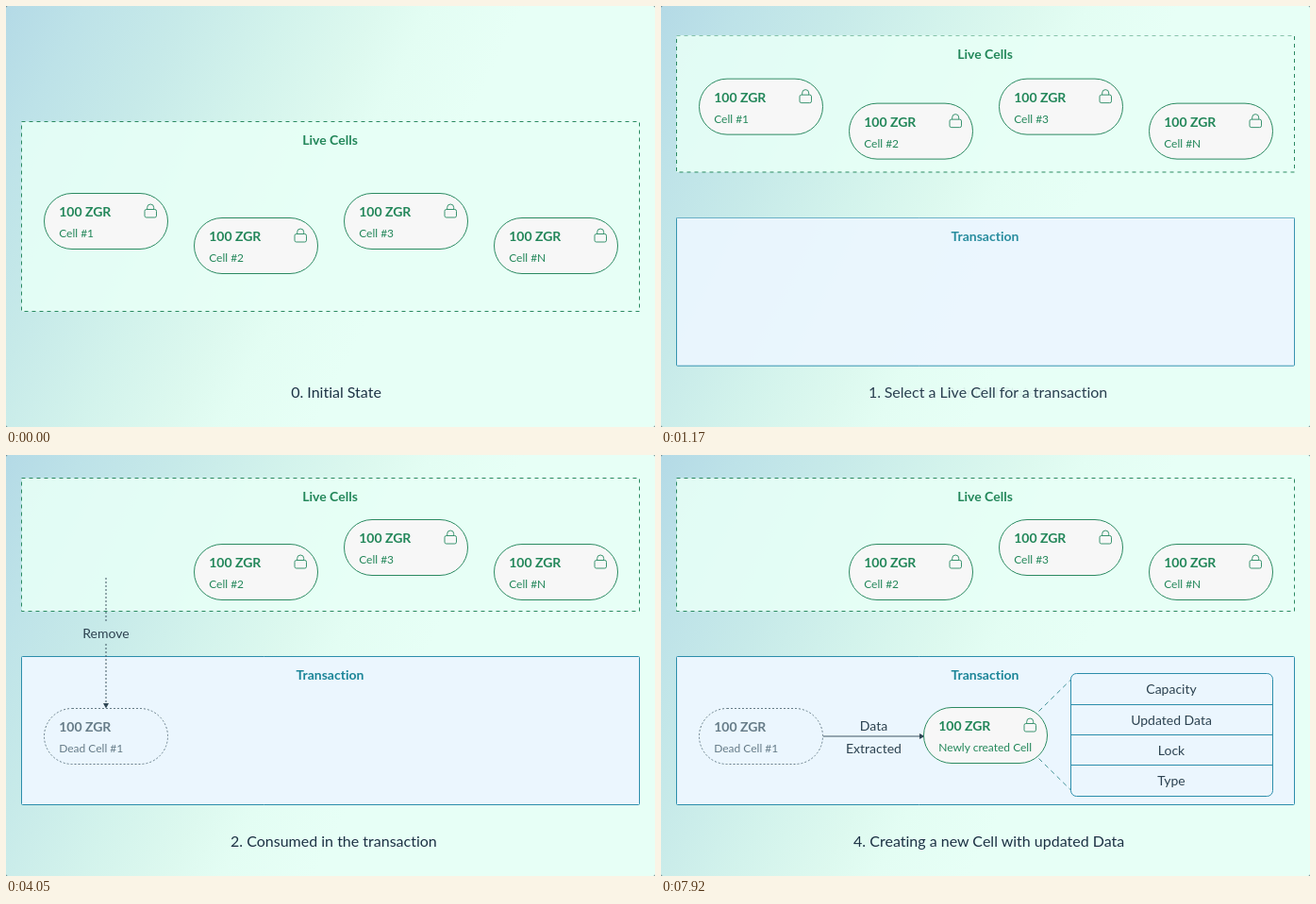
Recreate the animation shown at these times as an HTML page. Size 688 by 446 pixels, loop 8000 ms.

```html
<!DOCTYPE html>
<html lang="en">
<head>
<meta charset="utf-8">
<title>Cell life cycle</title>
<style>
  html, body { margin: 0; width: 100%; height: 100%; overflow: hidden; background: #4d6b72; }
  svg { display: block; width: 688px; height: 446px; font-family: Lato, sans-serif; font-variant-ligatures: none; }

  text { font-size: 14px; fill: #2c4250; }
  .mid { text-anchor: middle; }
  .bold { font-weight: 700; }
  .sub { font-size: 12px; }
  .caption text { font-size: 16px; fill: #1c3144; }
  .title, .live text, .head { fill: #23875a; }
  .dead text { fill: #667c88; }
  .tx { fill: #1b8598; }

  .shell { fill: #f7f7f7; stroke: #2b8a61; }
  .lock { fill: none; stroke: #3a9470; }
  .dead rect { fill: none; stroke: #667c88; stroke-dasharray: 2 2; }
  .teal { fill: #ebf6fe; stroke: #2b8dab; }
  .wire { fill: none; stroke: #3f5663; }
  .tip { fill: #2f4654; }

  /* Each rule below names the step at which a part moves, enters or leaves. */
  .a { animation: 8s ease-in-out infinite both; }
  .box { animation-name: box; }
  .boxmove { animation-name: boxmove; }
  .cells { animation-name: cells; }
  .txmove { animation-name: txmove; }
  .drop { animation-name: drop; }
  .in1 { animation-name: in1; }
  .out1 { animation-name: out1; }
  .in2 { animation-name: in2; }
  .out2 { animation-name: out2; }
  .in3 { animation-name: in3; }
  .out3 { animation-name: out3; }
  .in4 { animation-name: in4; }
  .out4 { animation-name: out4; }
  .in5 { animation-name: in5; }
  .mark { animation-name: mark; }

  @keyframes box {
    0%, 6.7125% { height: 201px; }
    16.3875%, 100% { height: 141px; }
  }
  @keyframes boxmove {
    0%, 6.7125% { transform: translateY(0); }
    16.3875%, 100% { transform: translateY(-98px); }
  }
  @keyframes cells {
    0%, 6.7125% { transform: translateY(0); }
    16.3875%, 100% { transform: translateY(-130px); }
  }
  @keyframes txmove {
    0%, 6.7125% { transform: translateY(161px); opacity: 0; }
    16.3875%, 100% { transform: translateY(0); opacity: 1; }
  }
  @keyframes drop {
    0%, 29.5625% { transform: translateY(0); }
    42.1875%, 100% { transform: translateY(200px); }
  }
  @keyframes mark {
    0%, 22.375% { opacity: 0; }
    25.75%, 29.5625% { opacity: 1; }
    42.1875%, 100% { opacity: 0; }
  }
  @keyframes in1 { 0%, 6.7125% { opacity: 0; } 16.3875%, 100% { opacity: 1; } }
  @keyframes out1 { 0%, 6.7125% { opacity: 1; } 16.3875%, 100% { opacity: 0; } }
  @keyframes in2 { 0%, 29.5625% { opacity: 0; } 42.1875%, 100% { opacity: 1; } }
  @keyframes out2 { 0%, 29.5625% { opacity: 1; } 42.1875%, 100% { opacity: 0; } }
  @keyframes in3 { 0%, 50.375% { opacity: 0; } 57.5%, 100% { opacity: 1; } }
  @keyframes out3 { 0%, 50.375% { opacity: 1; } 57.5%, 100% { opacity: 0; } }
  @keyframes in4 { 0%, 72.9375% { opacity: 0; } 79.3125%, 100% { opacity: 1; } }
  @keyframes out4 { 0%, 72.9375% { opacity: 1; } 79.3125%, 100% { opacity: 0; } }
  @keyframes in5 { 0%, 86.0625% { opacity: 0; } 94.1875%, 100% { opacity: 1; } }
</style>
</head>
<body>
<svg viewBox="0 0 688 446">
  <defs>
    <linearGradient id="sky" gradientUnits="userSpaceOnUse" x1="0" y1="0" x2="440" y2="220">
      <stop offset="0" stop-color="#b4dae6"/>
      <stop offset=".15" stop-color="#bde2e8"/>
      <stop offset=".35" stop-color="#c7eae9"/>
      <stop offset=".55" stop-color="#d3f3ec"/>
      <stop offset=".72" stop-color="#ddf9ef"/>
      <stop offset=".82" stop-color="#e3fdf3"/>
      <stop offset="1" stop-color="#e7fff6"/>
    </linearGradient>
    <g id="cell">
      <rect class="shell" width="131" height="59" rx="29.5"/>
      <g class="lock">
        <rect x="106.5" y="17" width="12.5" height="8.5" rx="1.8"/>
        <path d="M109.2 17v-2a3.5 3.5 0 0 1 7 0V17"/>
      </g>
      <text class="bold title" x="15.7" y="24.5">100 ZGR</text>
    </g>
  </defs>

  <rect width="688" height="446" rx="2" fill="url(#sky)"/>

  <g class="a boxmove">
    <rect class="a box" x="16.5" y="122.5" width="655" height="201" fill="#e7fff6" fill-opacity=".88"
          stroke="#2b8a61" stroke-dasharray="4 4"/>
    <text class="bold head mid" x="343.5" y="147">Live Cells</text>
  </g>

  <g class="a txmove">
    <rect class="teal" x="16.5" y="213.5" width="655" height="157" rx="1"/>
    <text class="bold tx mid" x="343.5" y="238">Transaction</text>
  </g>

  <rect class="a mark" x="33" y="58" width="146.5" height="80" fill="none" stroke="#c6c81c" stroke-width="2"/>

  <g class="a in2"><g class="a out3">
    <path class="wire" d="M106 130V178M106 200V264" stroke-dasharray="2 2"/>
    <path class="tip" d="M103 263h6l-3 5.5z"/>
    <text class="mid" x="106" y="194">Remove</text>
  </g></g>

  <g class="a cells">
    <g transform="translate(40.5 198.5)"><g class="a drop">
      <g class="a live out2">
        <use href="#cell"/>
        <text class="sub" x="15.7" y="46.5">Cell #1</text>
      </g>
      <g class="a dead in2">
        <rect width="131" height="59" rx="29.5"/>
        <text class="bold" x="15.7" y="24.5">100 ZGR</text>
        <text class="sub" x="15.7" y="46.5">Dead Cell #1</text>
      </g>
    </g></g>
    <g class="live" transform="translate(199.5 224.5)">
      <use href="#cell"/>
      <text class="sub" x="15.7" y="46.5">Cell #2</text>
    </g>
    <g class="live" transform="translate(358.5 198.5)">
      <use href="#cell"/>
      <text class="sub" x="15.7" y="46.5">Cell #3</text>
    </g>
    <g class="live" transform="translate(517.5 224.5)">
      <use href="#cell"/>
      <text class="sub" x="15.7" y="46.5">Cell #N</text>
    </g>
  </g>

  <g class="a in3">
    <path class="wire" d="M172 298H275"/>
    <path class="tip" d="M274 295v6l5.5-3z"/>
    <text class="mid" x="225.5" y="292">Data</text>
    <text class="mid" x="225.5" y="316">Extracted</text>
  </g>

  <g class="a in5">
    <path d="M400.5 271.5L434.5 238M400.5 321.5L434.5 355" fill="none" stroke="#3f8f96" stroke-dasharray="5 4"/>
    <rect class="teal" x="434.5" y="231.5" width="214" height="130" rx="6"/>
    <path class="teal" d="M434.5 264.5h214M434.5 296.5h214M434.5 328.5h214"/>
    <g class="mid">
      <text x="541" y="253">Capacity</text>
      <text x="541" y="285.5">Updated Data</text>
      <text x="541" y="318">Lock</text>
      <text x="541" y="350">Type</text>
    </g>
  </g>

  <g class="a in4"><g class="live" transform="translate(278.5 267.5)">
    <use href="#cell"/>
    <text class="sub" x="15.7" y="46.5">Newly created Cell</text>
  </g></g>

  <g class="caption">
    <text class="a out1 mid" x="350" y="415">0. Initial State</text>
    <g class="a in1"><g class="a out2">
      <text x="220" y="415">1.</text>
      <text class="mid" x="355" y="415">Select a Live Cell for a transaction</text>
    </g></g>
    <g class="a in2"><g class="a out3">
      <text x="238" y="415">2.</text>
      <text class="mid" x="356" y="415">Consumed in the transaction</text>
    </g></g>
    <g class="a in3"><g class="a out4">
      <text x="218.7" y="415">3.</text>
      <text class="mid" x="356.3" y="415">Data extracted from the Dead Cell</text>
    </g></g>
    <g class="a in4">
      <text x="204" y="415">4.</text>
      <text class="mid" x="356.3" y="415">Creating a new Cell with updated Data</text>
    </g>
  </g>
</svg>
</body>
</html>
```
